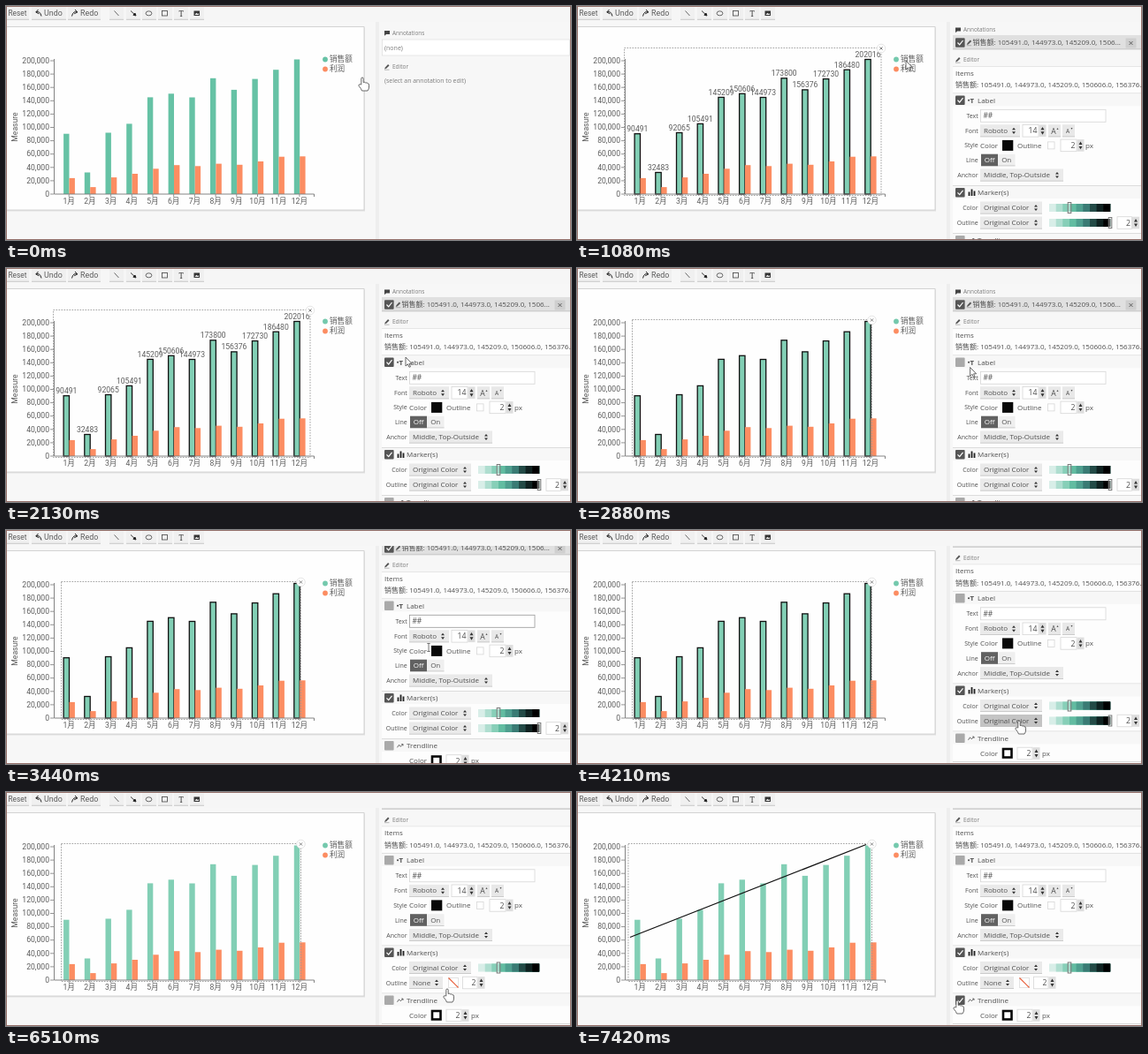
An HTML page for the animation above (8610 ms loop, 639 by 265 pixels).

```html
<!DOCTYPE html>
<html lang="en">
<head>
<meta charset="utf-8">
<title>Chart annotation editor</title>
<style>
html, body { margin: 0; height: 100%; overflow: hidden; background: #f7f7f7; }
svg { display: block; width: 100vw; height: 100vh; }
text { font-family: "Open Sans", "Noto Sans CJK SC", "Noto Sans CJK", sans-serif; fill: #505050; white-space: pre; }
.chart text, .tools text { font-family: Roboto, "Noto Sans CJK SC", "Noto Sans CJK", sans-serif; fill: #5c5c5c; }
text.soft { fill: #7a7a7a; }
.off { display: none; }
.field { fill: #fff; stroke: #d6d6d6; stroke-width: .8; }
.field.hot { stroke: #999; }
.pick { fill: #eaeaea; }
.pick.hot { fill: #c4c4c4; }
.box { fill: #a9a9a9; }
.box.on { fill: #555; }
.tick { fill: none; stroke: #fff; stroke-width: 1.2; }
.box:not(.on) + .tick { display: none; }
.ink { fill: none; stroke: #444; stroke-width: .8; }
.sel { fill: none; stroke: #999; stroke-width: .9; stroke-dasharray: 1.6 1.4; }
</style>
</head>
<body>
<svg id="stage" viewBox="0 0 639 265" preserveAspectRatio="none"></svg>
<script>
const LOOP = 8610;
const sales = [90491, 32483, 92065, 105491, 145209, 150606, 144973, 173800, 156376, 172730, 186480, 202016];
const profit = [24000, 10500, 25000, 30500, 38000, 43500, 42000, 45500, 44000, 49000, 56000, 56500];
const STEP = 23.7;
const yOf = v => 213 - v * 0.000755;

const attrs = o => Object.entries(o).map(([k, v]) => `${k}="${v}"`).join(' ');
const rect = (x, y, width, height, more = {}) => `<rect ${attrs({ x, y, width, height, ...more })}/>`;
const path = (d, more = { class: 'ink' }) => `<path ${attrs({ d, ...more })}/>`;
const group = (more, ...parts) => `<g ${attrs(more)}>${parts.flat().join('')}</g>`;
// y is the vertical middle of the line of text
const text = (x, y, s, size = 8, more = {}) =>
  `<text ${attrs({ x, y: +(y + size * .36).toFixed(2), 'font-size': size, ...more })}>${s}</text>`;
const END = { 'text-anchor': 'end' }, MID = { 'text-anchor': 'middle' }, SOFT = { class: 'soft' };

/* toolbar */
function toolbar() {
  const button = (x, w) => rect(x, 1.5, w, 14, { fill: '#f0f0f0' }) + rect(x, 14.8, w, .9, { fill: '#c4c4c4' });
  const turn = x => path('M.800 4Q5.500 2 7 8.500M3.500 1 .800 4 4.300 5.800',
    { class: 'ink', style: 'stroke:#222;stroke-width:1', transform: x });
  return group({ class: 'tools' },
    rect(0, 0, 639, 18, { fill: '#f6f6f6' }),
    button(0, 26), button(29, 39), button(70, 37),
    [117, 136, 154, 172, 190, 208].map(x => button(x, 16)),
    text(2.5, 8, 'Reset', 8.3), text(43, 8, 'Undo', 8.9), text(84, 8, 'Redo', 8.9),
    turn('translate(33 3)'), turn('translate(81.500 3) scale(-1 1)'),
    path('M122.500 5.500 127.500 11'),
    path('M141 5.500 146.500 10.500M147 11 143.800 10.200 146 8Z', { fill: '#222', stroke: '#222', 'stroke-width': .9 }),
    '<ellipse cx="161.500" cy="8.300" rx="3.400" ry="2.500" class="ink"/>',
    rect(176.5, 5.5, 6, 5.5, { class: 'ink' }),
    '<text x="198" y="11.500" font-size="8.500" text-anchor="middle" style="font-family:\'Noto Serif\',serif;fill:#333">T</text>',
    rect(212.5, 5.5, 6.5, 5.5, { fill: '#333' }),
    path('M213.500 10 215.300 7.800 216.600 9 217.500 8.300 218.300 10Z', { fill: '#eee' }));
}

/* chart */
function chart() {
  const months = sales.map((_, i) => 71.2 + STEP * i);
  const bars = (data, dx, more) => group(more, data.map((v, i) =>
    rect((months[i] + dx).toFixed(1), yOf(v).toFixed(1), 6.4, (213 - yOf(v)).toFixed(1))));
  const scale = Array.from({ length: 11 }, (_, i) => {
    const y = yOf(i * 20000);
    return path(`M50 ${y}h4`, { stroke: '#888', 'stroke-width': .9 }) +
      text(49, y - .4, (i * 20000).toLocaleString('en-US'), 8.6, END);
  });
  return group({ class: 'chart' },
    rect(-2, 24.5, 408, 208, { fill: '#e2e2e2' }),
    rect(-2, 23.5, 407, 207.5, { fill: '#fefefe', stroke: '#d0d0d0', 'stroke-width': .9 }),
    scale,
    bars(sales, -6.1, { id: 'green' }),
    bars(profit, .3, { fill: '#fc8d62' }),
    path('M54.500 60V213H348.500V216', { fill: 'none', stroke: '#777', 'stroke-width': .9 }),
    months.map((x, i) => path(`M${x} 213v3`, { stroke: '#888', 'stroke-width': .9 }) +
      text(x, 221.2, `${i + 1}月`, 8.6, MID)),
    '<text transform="translate(12.500 137) rotate(-90)" font-size="8.600" text-anchor="middle">Measure</text>',
    '<circle id="key" cx="361" cy="60.500" r="2.900"/><circle cx="361" cy="71.500" r="2.900" fill="#fc8d62"/>',
    text(366, 60.2, '销售额', 8.6), text(366, 71.2, '利润', 8.6),
    group({ id: 'labels' }, sales.map((v, i) =>
      text((months[i] - 2.9).toFixed(1), yOf(v) - 5.7, v, 8.6, MID))),
    path('M60 164.500 327 59.500', { id: 'trend', stroke: '#111', 'stroke-width': 1.3 }),
    group({ id: 'pickBox' },
      rect(0, 0, 1, 1, { id: 'frame', class: 'sel' }),
      group({ id: 'close' },
        '<circle r="4.800" fill="#fff" stroke="#ddd" stroke-width=".800"/>',
        path('M-1.600-1.600 1.600 1.600M1.600-1.600-1.600 1.600', { stroke: '#666', 'stroke-width': .8 }))));
}

/* side panel */
const check = (y, id, on = '') =>
  rect(428, y - 5.3, 10.6, 10.6, { rx: 1, class: 'box ' + on, id }) +
  path(`M430.500 ${y}l2.200 2.300 3.800-4.800`, { class: 'tick' });
const pencil = (x, y) => path(`M${x} ${y + 2.6}l.900-2.100 3.200-3.400 1.400 1.300-3.400 3.400Z`, { fill: '#555' }) +
  path(`M${x} ${y + 3.2}h5.500`, { stroke: '#999', 'stroke-width': .7 });
const note = (x, y) => path(`M${x} ${y - 2.5}h6v4h-4l-2 1.800Z`, { fill: '#444' });
const arrows = (x, y, h = 2.6) => path(
  `M${x - 2} ${y - 1}h4l-2-${h}ZM${x - 2} ${y + 1}h4l-2 ${h}Z`, { fill: '#333' });
const select = (x, y, w, s, id = '') => rect(x, y - 7, w, 14, { class: 'pick', id }) +
  rect(x, y + 6.2, w, .8, { fill: '#c4c4c4' }) + text(x + 4, y - .2, s) + arrows(x + w - 7, y);
const number = (x, y, s, w = 18) => rect(x, y - 6.8, w, 13.6, { class: 'field' }) +
  text(x + w - 1.5, y, s, 8.7, END) + rect(x + w + .5, y - 6.8, 8, 13.6, { fill: '#dedede' }) + arrows(x + w + 4.5, y, 3.4);
const label = (y, s) => text(453.7, y, s, 7, END);
const header = (y, s) => rect(425, y - 8.3, 213, 1, { fill: '#dcdcdc' }) +
  rect(425, y - 7.3, 213, 14, { fill: '#f7f7f7' }) + text(453, y, s);

const STOPS = [[0, 216, 238, 232], [.35, 102, 194, 165], [.58, 66, 140, 132], [.8, 26, 55, 52], [1, 0, 0, 0]];
function shade(k) {
  const i = Math.max(1, STOPS.findIndex(s => s[0] >= k));
  const a = STOPS[i - 1], b = STOPS[i], f = (k - a[0]) / (b[0] - a[0]);
  return `rgb(${[1, 2, 3].map(c => Math.round(a[c] + (b[c] - a[c]) * f))})`;
}
const ramp = (y, knob) => Array.from({ length: 9 }, (_, i) =>
  rect((534 + i * 7.66).toFixed(1), y - 4.5, 603 - Math.round(534 + i * 7.66), 9, { fill: shade(i / 8) })).join('') +
  rect(knob - 1.8, y - 6, 3.6, 12, { fill: '#fff', 'fill-opacity': .35, stroke: '#777', 'stroke-width': 1 });

const list = n => '销售额: ' + [105491, 144973, 145209, 150606, 156376].map(v => v + '.0').join(', ').slice(0, n);

function editor() {
  const y = { label: 106.7, text: 124.3, font: 141.3, style: 157.9, line: 174.5, anchor: 191.5,
    mark: 211.3, color: 228.5, outline: 245.5, trend: 265.3, tcolor: 282.5 };
  return group({ id: 'scroll' },
    note(428, 27), text(437, 27, 'Annotations', 6.4, SOFT),
    rect(425, 33, 213, 16.5, { fill: '#e0e0e0' }), rect(425, 48.2, 213, 1, { fill: '#cacaca' }),
    check(41.5, 'rowBox', 'on'), pencil(440.7, 41.5), text(447.5, 41, list(34) + '...'),
    rect(620.5, 36.5, 12, 11, { fill: '#cfcfcf' }), path('M624.500 40l4 4m0-4-4 4'),
    pencil(428, 61), text(437, 61, 'Editor', 6.5, SOFT),
    rect(425, 68, 213, 226, { fill: '#fdfdfd' }), rect(425, 68, 213, .8, { fill: '#e2e2e2' }),
    text(428, 75.8, 'Items'), text(428, 89.2, list(99)),

    header(y.label, 'Label'), check(y.label, 'labelBox'),
    `<circle cx="443" cy="${y.label}" r="1" fill="#444"/>`, text(444.5, y.label, 'T', 7.8, { 'font-weight': 700 }),
    label(y.text, 'Text'), rect(456.5, y.text - 7, 141.5, 14, { class: 'field', id: 'input' }), text(459.5, y.text, '##', 8.3),
    label(y.font, 'Font'), select(456, y.font, 45, 'Roboto'), number(504, y.font, '14'),
    [[533, 8.6, '▴'], [549, 6.5, '▾']].map(([x, s, m]) => rect(x, y.font - 7, 14, 14, { fill: '#e8e8e8' }) +
      rect(x, y.font + 6.2, 14, .8, { fill: '#c4c4c4' }) + text(x + 6, y.font + .3, 'A', s, MID) +
      text(x + 10.5, y.font - 3, m, 4, MID)),
    label(y.style, 'Style'), text(456, y.style, 'Color'),
    rect(481, y.style - 6, 12.3, 12, { fill: '#080808' }), text(498, y.style, 'Outline'),
    rect(532.5, y.style - 4, 7.5, 8, { class: 'field' }), number(547, y.style, '2'), text(575, y.style, 'px'),
    label(y.line, 'Line'), rect(457, y.line - 6.8, 19, 13.6, { fill: '#616161' }),
    rect(476, y.line - 6.8, 19.5, 13.6, { fill: '#efefef' }), rect(476, y.line + 6, 19.5, .8, { fill: '#c4c4c4' }),
    text(466.5, y.line, 'Off', 8, { ...MID, style: 'fill:#fff' }), text(485.7, y.line, 'On', 8, MID),
    label(y.anchor, 'Anchor'), select(456, y.anchor, 94, 'Middle, Top-Outside'),

    header(y.mark, 'Marker(s)'), check(y.mark, 'markBox', 'on'),
    path(`M443.500 ${y.mark + 3.7}v-4.500m3 4.500v-7.500m3 7.500v-5.500`, { stroke: '#222', 'stroke-width': 1.8 }),
    label(y.color, 'Color'), select(456, y.color, 70, 'Original Color', 'colorPick'), ramp(y.color, 557),
    label(y.outline, 'Outline'),
    group({ id: 'withOutline' }, select(456, y.outline, 70, 'Original Color', 'outlinePick'),
      ramp(y.outline, 603), number(611, y.outline, '2', 16.5)),
    group({ id: 'noOutline' }, select(456, y.outline, 38, 'None'),
      rect(500.5, y.outline - 5.5, 11, 11, { fill: '#fff', stroke: '#ddd', 'stroke-width': .8 }),
      path(`M500.500 ${y.outline - 5.5}l11 11`, { stroke: '#e8603c', 'stroke-width': 1.2 }),
      number(516.5, y.outline, '2', 16.5)),

    header(y.trend, 'Trendline'), check(y.trend, 'trendBox'),
    path(`M442.500 ${y.trend + 2}l2-3 1.800 2 2.500-2.500m-1.600-.2h1.800v1.800`),
    text(456, y.tcolor, 'Color'),
    rect(482, y.tcolor - 5, 9.5, 9.5, { fill: '#fff', stroke: '#080808', 'stroke-width': 2.6 }),
    number(498, y.tcolor, '2', 17), text(526, y.tcolor, 'px'),
    rect(425, 291.5, 213, .8, { fill: '#d0d0d0' }));
}

const blank = () => group({ id: 'blank' },
  note(428, 30.5), text(437, 30.5, 'Annotations', 6.4, SOFT),
  rect(425.5, 38, 212, 18, { fill: '#fff', stroke: '#e0e0e0', 'stroke-width': .8 }), text(428, 47, '(none)', 7, SOFT),
  pencil(428, 69), text(437, 69, 'Editor', 6.5, SOFT), text(428, 85, '(select an annotation to edit)', 6.9, SOFT));

const menu = () => group({ id: 'menu' },
  rect(456, 161, 74, 47, { fill: '#fff', stroke: '#999', 'stroke-width': .8 }),
  rect(456.5, 177, 73, 15, { fill: '#d0d0d0' }),
  ['None', 'Original Color', 'Custom'].map((s, i) => text(460, 169 + i * 15.5, s)));

const GLYPH = { fill: '#fff', stroke: '#444', 'stroke-width': .8, 'stroke-linejoin': 'round' };
const pointer = () => group({ id: 'pointer' },
  path('M-1.200 8V1.200a1.200 1.200 0 0 1 2.400 0V5.500q2-.700 2.500.500 1.900-.500 2.300.700 1.500 0 1.500 1.500V11q0 2-1.500 4H-.500Q-1.200 12.500-4 9.500-4.300 7.400-2.600 7.700Z',
    { ...GLYPH, id: 'hand' }),
  path('M0 0V10L2.400 7.800 4 11.300 5.500 10.700 4 7.300H7Z', { ...GLYPH, id: 'arrow' }),
  path('M-1.700-4.500H1.700M0-4.500V4.500M-1.700 4.500H1.700', { id: 'beam', stroke: '#555', 'stroke-width': .8 }));

document.getElementById('stage').innerHTML =
  '<clipPath id="view"><rect x="422" y="18" width="216" height="246"/></clipPath>' +
  rect(0, 0, 639, 265, { fill: '#f7f7f7' }) + toolbar() + chart() +
  rect(418, 18, 4, 246, { fill: '#eee' }) +
  group({ 'clip-path': 'url(#view)' }, blank(), editor()) + menu() +
  rect(.5, .5, 638, 264, { fill: 'none', stroke: '#94706a', 'stroke-width': 1 }) + pointer();

/* motion */
const $ = id => document.getElementById(id);
const show = (id, on) => $(id).classList.toggle('off', !on);
const flag = (id, name, on) => $(id).classList.toggle(name, on);
const set = (id, o) => Object.entries(o).forEach(([k, v]) => $(id).setAttribute(k, v));

const PICK = 410, UNLABEL = 2680, NO_OUTLINE = 4760, TREND = 7420;
const moves = [
  [0, 403, 81, 'hand'], [70, 403, 81, 'hand'], [410, 372, 62, 'hand'], [1080, 372, 62, 'arrow'],
  [1640, 481, 121, 'beam'], [1990, 481, 121, 'beam'], [2130, 452, 101, 'arrow'], [2200, 452, 101, 'arrow'],
  [2410, 434, 106, 'hand'], [2750, 434, 106, 'arrow'], [3160, 478, 133, 'beam'], [3510, 478, 133, 'arrow'],
  [4140, 500, 216, 'hand'], [4480, 500, 216, 'hand'], [4690, 480, 167, 'hand'], [4830, 480, 167, 'hand'],
  [5280, 492, 195, 'hand'], [5430, 492, 195, 'hand'], [5570, 496, 197, 'hand'], [6100, 496, 197, 'hand'],
  [6310, 499, 223, 'hand'], [6510, 499, 223, 'hand'], [7350, 430, 236, 'hand'], [LOOP, 430, 236, 'hand']];
const scrolls = [[0, 0], [1710, 10], [1780, 22], [1850, 29.5], [2060, 12], [2130, 0], [3370, 10], [3440, 21], [3510, 29.5]];

function draw(t) {
  const between = (a, b) => t >= a && t < b;
  const picked = t >= PICK, labelled = between(PICK, UNLABEL), outlined = between(PICK, NO_OUTLINE);

  set('green', { fill: picked ? '#82cfb5' : '#66c2a5', stroke: outlined ? '#111' : 'none', 'stroke-width': 1.3 });
  set('key', { fill: picked ? '#74c9ad' : '#66c2a5' });
  show('labels', labelled);
  show('trend', t >= TREND);
  show('pickBox', picked);
  const [x, y, r] = labelled ? [53.5, 47.5, 344] : [t >= TREND ? 58 : 62.5, 58.5, 333.5];
  set('frame', { x, y, width: r - x, height: 214.5 - y });
  set('close', { transform: `translate(${r} ${y + .5})` });

  show('blank', !picked);
  show('scroll', picked);
  set('scroll', { transform: `translate(0 ${-scrolls.findLast(s => s[0] <= t)[1]})` });
  flag('labelBox', 'on', labelled);
  flag('trendBox', 'on', t >= TREND);
  show('withOutline', outlined);
  show('noOutline', !outlined);
  show('menu', between(4280, NO_OUTLINE));
  flag('input', 'hot', between(1570, 2060) || between(2960, 3700));
  flag('outlinePick', 'hot', between(4000, NO_OUTLINE));
  flag('colorPick', 'hot', between(5100, 6200));

  const i = moves.findLastIndex(m => m[0] <= t), a = moves[i], b = moves[i + 1];
  const k = (t - a[0]) / (b[0] - a[0]), e = k * k * (3 - 2 * k);
  set('pointer', { transform: `translate(${a[1] + (b[1] - a[1]) * e} ${a[2] + (b[2] - a[2]) * e})` });
  for (const id of ['hand', 'arrow', 'beam']) show(id, a[3] === id);
}

const start = performance.now();
function tick() {
  draw((performance.now() - start) % LOOP);
  requestAnimationFrame(tick);
}
tick();
</script>
</body>
</html>
```
